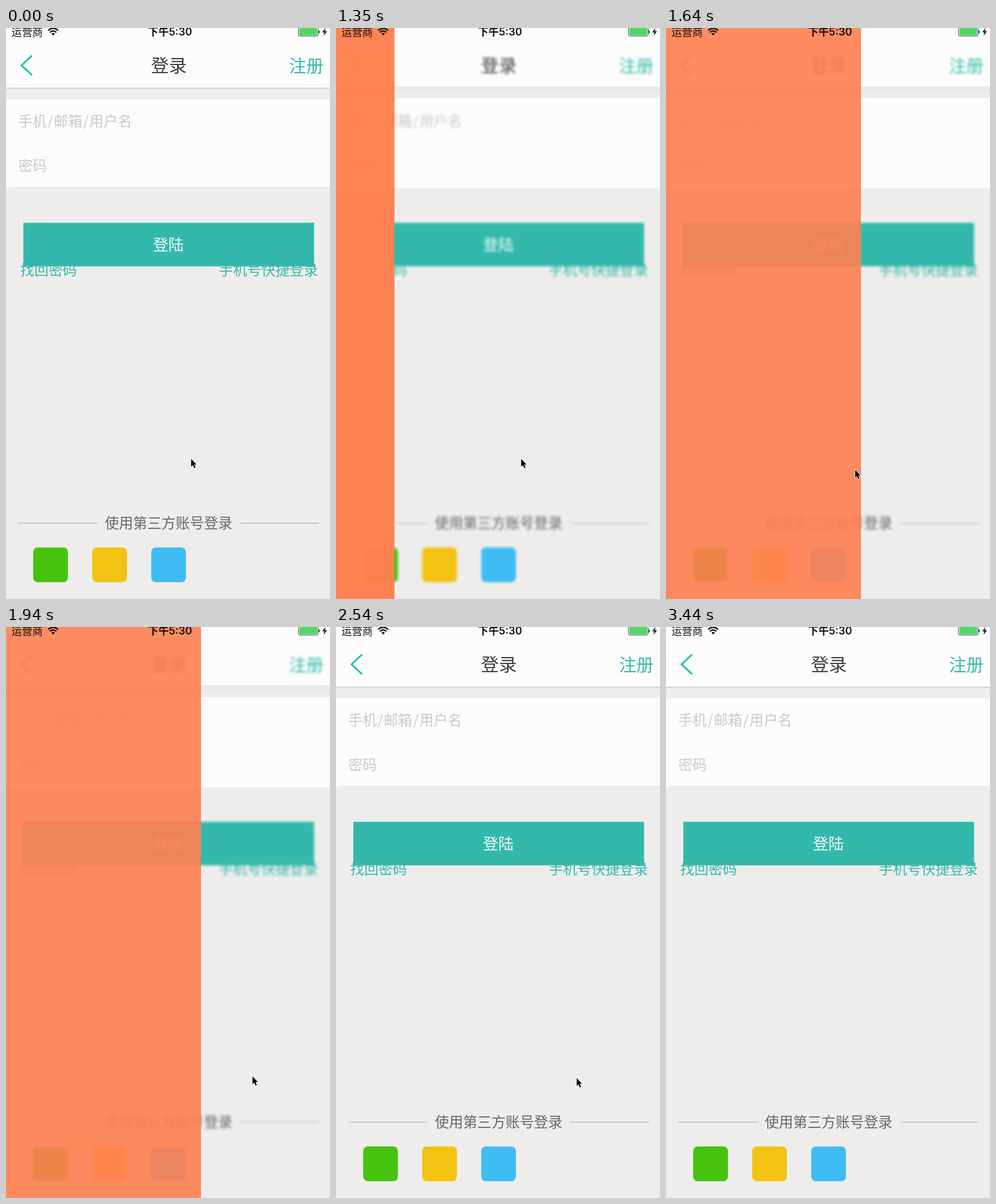
An HTML page for the animation above (3580 ms loop, 560 px wide and 986 px high).

```html
<!DOCTYPE html>
<html lang="zh-CN">
<head>
<meta charset="utf-8">
<title>登录</title>
<style>
  html, body { margin: 0; width: 100%; height: 100%; overflow: hidden; background: #eeedec; }
  svg { display: block; width: 100%; height: 100%; }
  text { font: 300 24.5px "Noto Sans CJK SC", "Noto Sans CJK", sans-serif; text-anchor: middle; }
  .teal { fill: #33b9ab; }
  .hint { fill: #cacaca; }
  #status text { font: 500 18px Inter, "Noto Sans CJK SC", "Noto Sans CJK", sans-serif; fill: #111; }
  #status .clock { font-weight: 600; }
  .soft #page { filter: blur(2.2px); }
  .soft .sharp-only, svg:not(.soft) .soft-only { display: none; }
</style>
</head>
<body>
<svg id="stage" viewBox="0 0 560 986">
  <rect width="560" height="986" fill="#eeedec"/>
  <g class="sharp-only">
    <path d="M0 0H560V103H0ZM0 123H560V274H5V276H0Z" fill="#fcfcfc"/>
    <path d="M0 103.8H560" stroke="#cbcbcb" stroke-width="1.6"/>
    <path d="M5 274.5H560" stroke="#e7e6e5"/>
  </g>
  <g class="soft-only">
    <path d="M0 0H560V101H0ZM0 121H560V277H0Z" fill="#fcfcfc"/>
    <path d="M0 101H560V110H0Z" fill="#e9e9e7"/>
  </g>

  <g id="page">
    <path d="M45 47.5 27 64.5 45 81.5" fill="none" stroke="#1dbbac" stroke-width="3"/>
    <text x="281.5" y="75.5" style="font-size:31px" fill="#3c3c3c">登录</text>
    <text x="519" y="76" style="font-size:29.8px" class="teal">注册</text>
    <text x="119.5" y="169.5" class="hint">手机<tspan dx="1.5">/</tspan><tspan dx="1.5">邮箱</tspan><tspan dx="1.5">/</tspan><tspan dx="1.5">用户名</tspan></text>
    <text x="46" y="247" class="hint">密码</text>
    <text x="73.5" y="426.5" class="teal">找回密码</text>
    <text x="453.5" y="426.5" class="teal">手机号快捷登录</text>
    <rect x="30" y="336.4" width="502.5" height="75.2" class="teal"/>
    <text x="280.5" y="384" style="font-size:26.6px" fill="#f4fbfa">登陆</text>
    <path d="M21 855H158M405 855H541" stroke="#c6c6c5" stroke-width="1.8"/>
    <text x="281" y="863.5" fill="#666">使用第三方账号登录</text>
    <rect x="47" y="897" width="60" height="60" rx="8" fill="#46c30f"/>
    <rect x="149" y="897" width="60" height="60" rx="8" fill="#f2c311"/>
    <rect x="251" y="897" width="60" height="60" rx="8" fill="#40bcf4"/>
  </g>

  <rect id="panel" height="986" fill="coral"/>

  <g id="status">
    <text x="36.5" y="13.5">运营商</text>
    <text x="283.5" y="13" class="clock">下午5:30</text>
    <g fill="none" stroke="#111" stroke-width="2.4">
      <path d="M73 4.3Q81.5 -3.3 90 4.3M76 7.6Q81.5 2.6 87 7.6"/>
      <path d="M78.6 9.8Q81.5 7.4 84.4 9.8L81.5 13Z" fill="#111" stroke="none"/>
    </g>
    <rect x="505.5" y="-1" width="34" height="15" rx="2.5" fill="#fcfcfc" stroke="#444"/>
    <rect x="507" y="0" width="31" height="12.8" rx="1.5" fill="#4cd964"/>
    <path d="M540.5 4q2 .5 2 2.7t-2 2.7ZM552 0 546.5 7.6H550L549 13.5 555 5.6H551.3Z" fill="#222"/>
  </g>

  <path id="cursor" d="M0 0V13.5L3 10.7 5.3 16 7.6 15 5.3 9.8H9.4Z"
        stroke="#fff" stroke-width="1.6" paint-order="stroke"/>
</svg>
<script>
  const LOOP = 3580, OPENING = 1190, TICK = 150;
  const SLIDE = 495, HEAD_START = 32, PANEL_WIDTH = 337;
  const CLOSE_TICK = 9, EXIT_TICK = 15;

  // where the hand pauses or turns: tick, x, y
  const turns = [[2, 320, 744], [3, 327, 763], [6, 459, 778], [8, 416, 779], [10, 416, 779], [14, 515, 983]];

  const [stage, panel, cursor] = ["stage", "panel", "cursor"].map(id => document.getElementById(id));
  const clamp = u => Math.min(1, Math.max(0, u));
  const easeInOut = u => (1 - Math.cos(Math.PI * u)) / 2;
  const easeOut = u => Math.sin(Math.PI / 2 * u);
  const mix = (a, b, u) => a + (b - a) * u;

  function pointerAt(tick) {
    const next = clamp01Index(turns.findIndex(turn => turn[0] > tick));
    const [t0, x0, y0] = turns[next - 1], [t1, x1, y1] = turns[next];
    const u = clamp((tick - t0) / (t1 - t0));
    return [mix(x0, x1, easeInOut(u)), mix(y0, y1, easeOut(u))];
  }

  function clamp01Index(index) {
    return index < 0 ? turns.length - 1 : Math.max(1, index);
  }

  const start = performance.now();

  function draw() {
    const time = Math.max(0, performance.now() - start) % LOOP;
    const tick = Math.floor((time - OPENING) / TICK);
    const open = tick >= 0 && tick < CLOSE_TICK;
    const slide = open ? easeInOut(clamp((tick * TICK + HEAD_START) / SLIDE)) : 0;

    stage.classList.toggle("soft", open);
    panel.setAttribute("width", Math.ceil(PANEL_WIDTH * slide));
    panel.setAttribute("opacity", 1 - 0.1 * slide);
    cursor.setAttribute("transform", `translate(${pointerAt(tick)})`);
    cursor.setAttribute("visibility", tick < EXIT_TICK ? "visible" : "hidden");
    requestAnimationFrame(draw);
  }
  draw();
</script>
</body>
</html>
```
